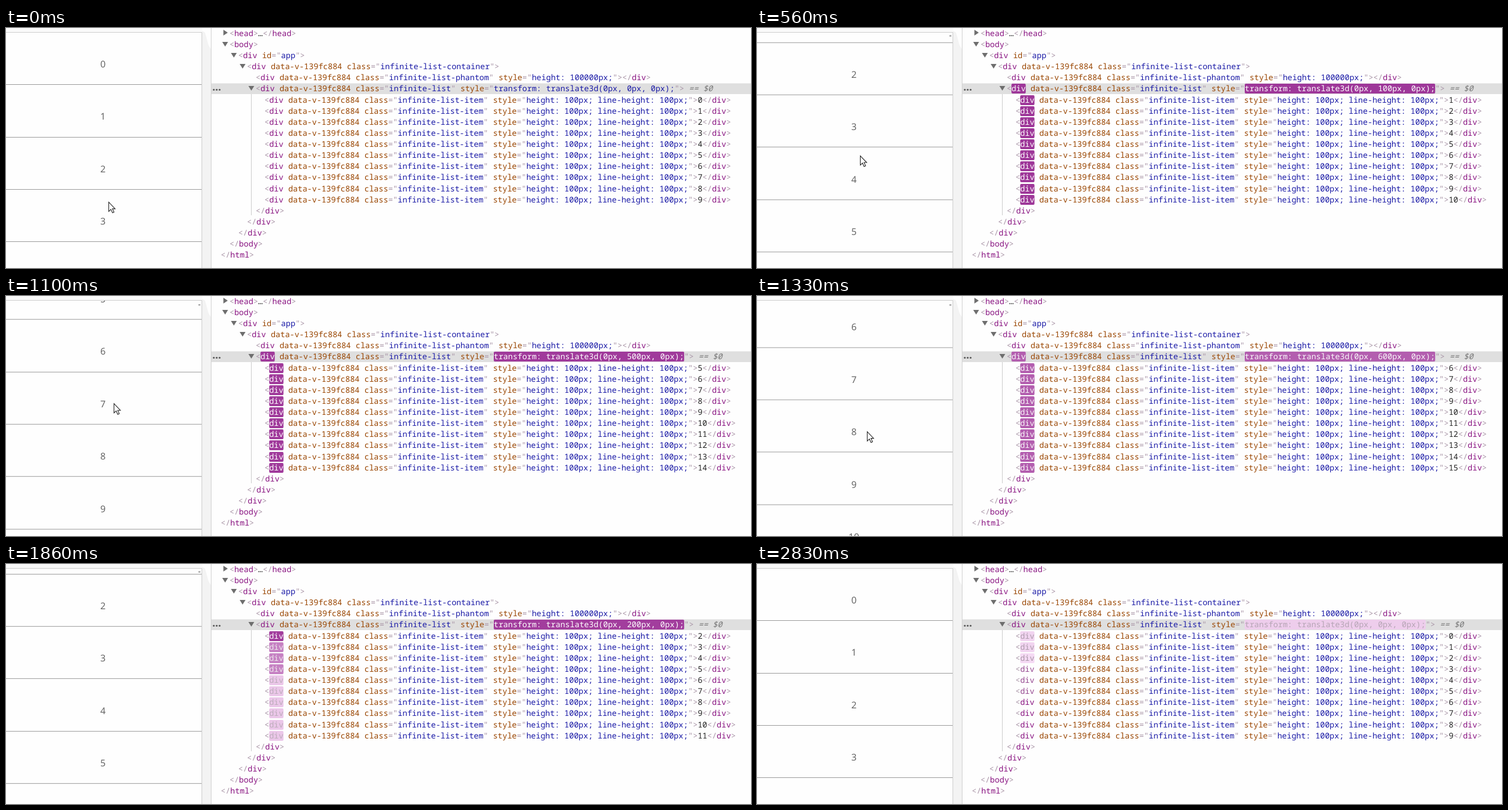
An HTML page that plays this animation: 1280 px wide and 414 px high, repeating every 2.93 s.

```html
<!DOCTYPE html>
<html lang="en">
<head>
<meta charset="utf-8">
<title>Virtual list</title>
<style>
  html, body { margin: 0; width: 100%; height: 100%; overflow: hidden; background: #fefefe; }
  svg { display: block; }
  text { white-space: pre; text-rendering: geometricPrecision; }
  #code text { font: 13.633px "Noto Sans Mono", monospace; }
  #list text { font: 16px "Noto Sans", sans-serif; fill: #666; text-anchor: middle; }
  #list rect { fill: #999; }
  .punct { fill: #a894a6; }
  .tag { fill: #881280; }
  .attr { fill: #994500; }
  .value { fill: #1a1aa6; }
  .plain { fill: #222; }
  .note { fill: #777; font-style: italic; }
</style>
</head>
<body>
<svg width="1280" height="414" viewBox="0 0 1280 414">
  <defs><clipPath id="screen"><rect y="8" width="336" height="406"/></clipPath></defs>
  <rect width="337" height="7" fill="#fafafa"/>
  <path d="M337 5L342 8L348 30L352 36V414H337Z" fill="#f3f3f3"/>
  <path d="M0 7.5H336.5V414" fill="none" stroke="#ccc"/>
  <path d="M352.5 0V414" stroke="#d0d0d0"/>
  <g clip-path="url(#screen)"><g id="list"></g></g>
  <rect id="thumb" x="330.5" width="3.5" height="2.5" fill="#aaa"/>
  <rect x="353" y="95.5" width="927" height="18.5" fill="#dfdfdf"/>
  <path d="M421.5 114V323" stroke="#ccc"/>
  <g id="arrows" fill="#6e6e6e"><path d="M373.5 3V13L381 8Z"/></g>
  <g fill="#555"><circle cx="357" cy="106.5" r="1.6"/><circle cx="362" cy="106.5" r="1.6"/><circle cx="367" cy="106.5" r="1.6"/></g>
  <g id="marks"></g>
  <g id="code"></g>
  <path id="cursor" d="M.5 .5V16.5L4.2 13L7 19L9.6 17.8L6.9 12H11.5Z" fill="#fff" stroke="#222" stroke-width="1.1"/>
</svg>
<script>
const LOOP = 2930, CHAR = 8.18, PITCH = 90.4;
const FADE = 1090, TAIL = 280, SCROLL_BACK = 1670;
const WHITE = [255, 255, 255], PUNCT = [168, 148, 166], TAG = [136, 18, 128], VALUE = [26, 26, 166];
const FLASH = [158, 54, 153], PALE = [245, 219, 244];

// time, first rendered item
const UPDATES = [[560, 1], [670, 2], [755, 3], [1000, 4], [1095, 5], [1250, 6],
                 [SCROLL_BACK, 3], [1850, 2], [2030, 0], [2150, 0]];
// time, scroll offset in items
const SCROLL = [[20, 0], [200, .3], [560, 1.8], [880, 3.57], [1100, 5.63], [1240, 6.1], [1360, 6.1],
                [1570, 5.48], [1800, 2.5], [2000, .5], [2120, 0]];
// time, x, y
const POINTER = [[0, 176, 300], [560, 177, 220], [880, 178, 235], [1100, 185, 185], [1570, 193, 284], [1850, 197, 420]];

const byId = id => document.getElementById(id);
const mix = (a, b, k) => a.map((v, i) => v + (b[i] - v) * k);
const css = c => `rgb(${c.map(Math.round)})`;
const baseline = row => Math.round(13.75 + 19.13 * row);

function add(parent, name, attrs, text) {
  const el = document.createElementNS('http://www.w3.org/2000/svg', name);
  for (const key in attrs) el.setAttribute(key, attrs[key]);
  if (text !== undefined) el.textContent = text;
  return parent.appendChild(el);
}

function track(keys, t) {
  const next = keys.findIndex(k => k[0] > t);
  if (next === 0) return keys[0].slice(1);
  if (next < 0) return keys[keys.length - 1].slice(1);
  const a = keys[next - 1], b = keys[next];
  return mix(a, b, (t - a[0]) / (b[0] - a[0])).slice(1);
}

// cubic-bezier(0, 0, 0.2, 1)
function easeOut(x) {
  let lo = 0, hi = 1;
  for (let i = 0; i < 16; i++) {
    const u = (lo + hi) / 2;
    if (.6 * u * u * (1 - u) + u ** 3 < x) lo = u; else hi = u;
  }
  return 3 * lo * lo * (1 - lo) + lo ** 3;
}

// Draws one line of markup and returns its pieces with their columns.
function drawLine(line, depth, row, parts) {
  const x = 369 + 15 * depth;
  let col = 0;
  line.replaceChildren();
  line.setAttribute('y', baseline(row));
  return parts.map(([kind, text]) => {
    const piece = { el: add(line, 'tspan', { x: x + col * CHAR, class: kind }, text),
                    x: x + col * CHAR, width: text.length * CHAR };
    col += text.length;
    return piece;
  });
}

const open = (name, attrs = {}) => [['punct', '<'], ['tag', name],
  ...Object.entries(attrs).flatMap(([key, value]) => value === ''
    ? [['attr', ' ' + key]]
    : [['attr', ' ' + key], ['punct', '="'], ['value', value], ['punct', '"']]),
  ['punct', '>']];
const close = name => [['punct', '</'], ['tag', name], ['punct', '>']];
const scoped = (cls, style) => ({ 'data-v-139fc884': '', class: cls, ...(style && { style }) });

const code = byId('code');
const newLine = () => add(code, 'text', {});
[
  [1, 0, [...open('head'), ['plain', '…'], ...close('head')]],
  [1, 1, open('body')],
  [2, 2, open('div', { id: 'app' })],
  [3, 3, open('div', scoped('infinite-list-container'))],
  [4, 4, [...open('div', scoped('infinite-list-phantom', 'height: 100000px;')), ...close('div')]],
  [4, 16, close('div')],
  [3, 17, close('div')],
  [2, 18, close('div')],
  [1, 19, close('body')],
  [0, 20, close('html')]
].forEach(([depth, row, parts]) => drawLine(newLine(), depth, row, parts));

[[376.5, 28], [391.5, 47], [406.5, 66], [421.5, 104]].forEach(([x, y]) =>
  add(byId('arrows'), 'path', { d: `M${x - 5} ${y - 4}h10l-5 8Z` }));

for (let n = 0; n < 12; n++) {
  add(byId('list'), 'text', { x: 166.5, y: Math.round(68 + n * PITCH) }, n);
  add(byId('list'), 'rect', { y: Math.round(97.2 + n * PITCH), width: 336, height: 1 });
}

const newMark = () => add(byId('marks'), 'rect', { height: 17, rx: 2 });
const parentLine = newLine(), parentMark = newMark(), styleMark = newMark();
const items = Array.from({ length: 10 }, () => ({ line: newLine(), mark: newMark() }));
let parentTag, styleValue, shownFirst = -1;

function place(mark, piece, row) {
  mark.setAttribute('x', piece.x);
  mark.setAttribute('y', baseline(row) - 13);
  mark.setAttribute('width', piece.width);
}

function renderMarkup(first) {
  shownFirst = first;
  const offset = first * 100;
  const parts = drawLine(parentLine, 4, 5, [
    ...open('div', scoped('infinite-list', `transform: translate3d(0px, ${offset}px, 0px);`)),
    ['note', ' == $0']]);
  parentTag = parts[1];
  styleValue = parts[parts.length - 4];
  place(parentMark, parentTag, 5);
  place(styleMark, styleValue, 5);
  items.forEach((item, i) => {
    item.tag = drawLine(item.line, 5, 6 + i, [
      ...open('div', scoped('infinite-list-item', 'height: 100px; line-height: 100px;')),
      ['plain', String(first + i)], ...close('div')])[1];
    place(item.mark, item.tag, 6 + i);
  });
}

// The label stays light for longer than its background.
function flash(mark, piece, age, rest) {
  const k = easeOut(Math.min(age / FADE, 1));
  mark.style.display = age < FADE ? '' : 'none';
  mark.style.fill = css(mix(FLASH, PALE, k));
  piece.el.style.fill = css(age < FADE
    ? mix(WHITE, PUNCT, k * k)
    : mix(PUNCT, rest, easeOut(Math.min((age - FADE) / TAIL, 1))));
}

function draw(t) {
  // Scrolling down refreshes every row, scrolling up only the inserted ones.
  const stamps = {};
  let first = 0, parentStamp = -Infinity, styleStamp = -Infinity;
  for (const [time, start] of UPDATES) {
    if (time > t) break;
    const end = start > first ? start + 10 : first;
    for (let n = start; n < end; n++) stamps[n] = time;
    parentStamp = start > first ? time : -Infinity;
    styleStamp = time;
    first = start;
  }
  if (first !== shownFirst) renderMarkup(first);
  flash(parentMark, parentTag, t - parentStamp, TAG);
  flash(styleMark, styleValue, t - styleStamp, VALUE);
  items.forEach(({ mark, tag }, i) => flash(mark, tag, t - (stamps[first + i] ?? -Infinity), TAG));

  const [scroll] = track(SCROLL, t);
  byId('list').setAttribute('transform', `translate(0 ${-scroll * PITCH})`);
  byId('thumb').setAttribute('y', 11.5 + scroll * .45);
  byId('thumb').setAttribute('opacity', t < 20 ? 0 : Math.max(0, Math.min(1, (2740 - t) / 300)));
  byId('cursor').setAttribute('transform', `translate(${track(POINTER, t).join(' ')})`);
}

const began = performance.now();
function tick() {
  draw((performance.now() - began) % LOOP);
  requestAnimationFrame(tick);
}
tick();
</script>
</body>
</html>
```
